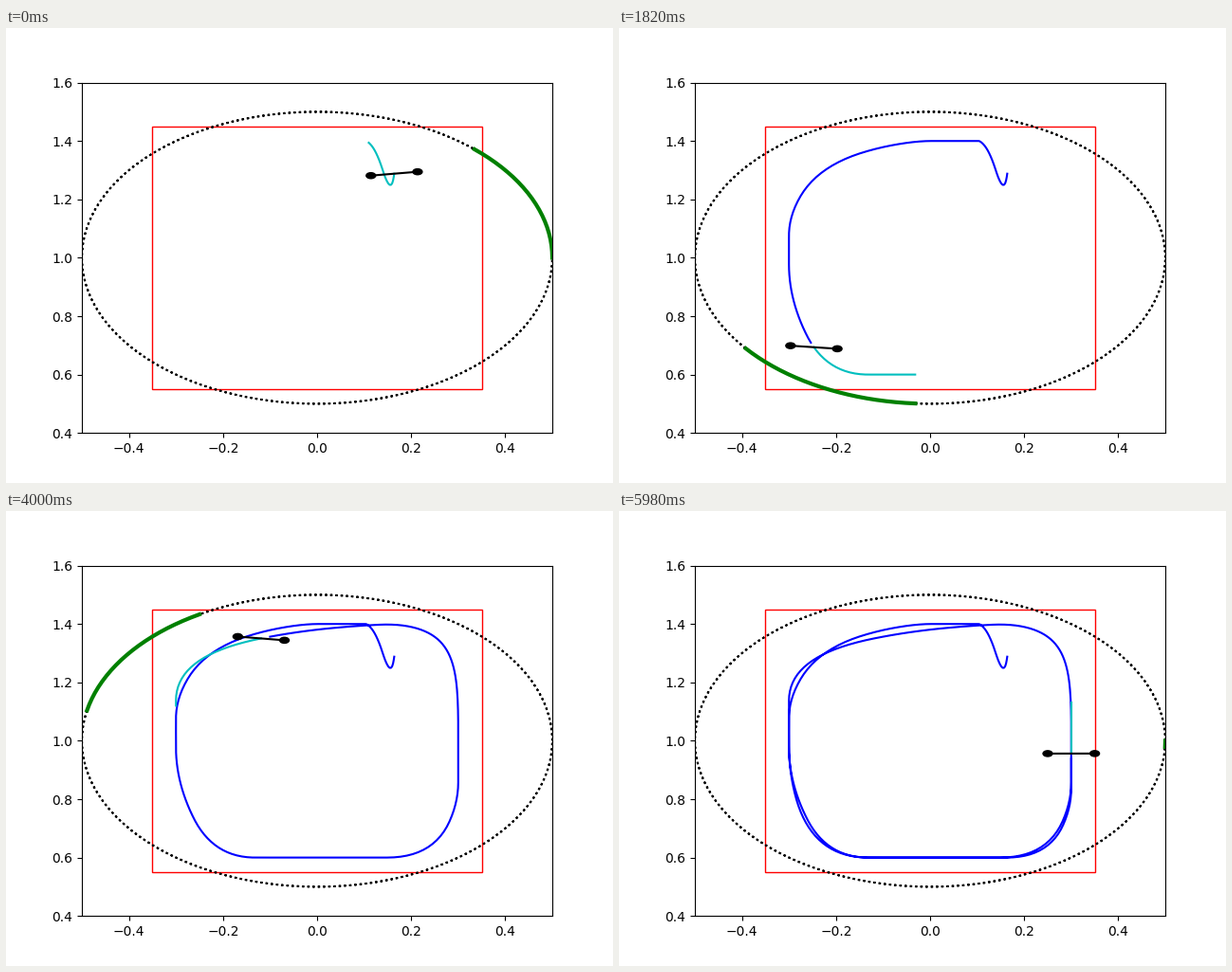
These frames come from a looping animation (640x480 px, 6 s). A matplotlib script:

```python
import numpy as np
import matplotlib.pyplot as plt
from matplotlib.animation import FuncAnimation
from matplotlib.patches import Circle, Rectangle

STEPS = 300       # two laps of the ellipse
HORIZON = 20      # look-ahead steps
ARM = 0.05
G = 9.81
DT = 0.02


def glide(t, dist, start, end, rise, fall, power=1):
    """Travel dist: speed rises as a power, stays level, falls linearly."""
    span = end - start
    u = np.clip(t - start, 0, span)
    ramp = rise * (np.minimum(u, rise) / rise) ** (power + 1) / (power + 1)
    level = np.maximum(u - rise, 0)
    brake = np.maximum(u - span + fall, 0) ** 2 / (2 * fall)
    total = span - rise * power / (power + 1) - fall / 2
    return dist * (ramp + level - brake) / total


# Each axis glides from wall to wall of the flight box
t = np.arange(STEPS + HORIZON)
px = (0.164
      + glide(t, -.064, 0, 27, 6, 8)
      + glide(t, -.4, 25, 69.5, 22, 19)
      + glide(t, .6, 75, 142, 42, 23)
      + glide(t, -.6, 150, 219, 42, 19, 2)
      + glide(t, .6, 227, 292, 33, 24))
py = (1.288
      + glide(t, -.045, 0, 7, 2, 4)
      + glide(t, .157, 4, 23, 6, 12)
      + glide(t, -.8, 41, 103.5, 21, 15)
      + glide(t, .8, 122, 186, 13, 31)
      + glide(t, -.8, 180, 253, 48, 18.8, 1.5)
      + glide(t, .53, 272, 319, 13, 20))

# The body leans into its sideways acceleration
kernel = np.exp(-0.5 * (np.arange(-9, 10) / 3) ** 2)
accel = np.pad(np.diff(px, 2), 10, mode="edge") / DT ** 2
accel = np.convolve(accel, kernel / kernel.sum(), mode="valid")
tilt = -np.arctan(accel / G)

theta = np.linspace(0, 4 * np.pi, STEPS + 1)
ref_x, ref_y = 0.5 * np.cos(theta), 1 + 0.5 * np.sin(theta)

fig, ax = plt.subplots(figsize=(6.4, 4.8), dpi=100)
ax.set_xlim(-0.5, 0.5)
ax.set_ylim(0.4, 1.6)
ax.add_patch(Rectangle((-.35, .55), .7, .9, fill=False, ec="red", lw=1))
ax.plot(ref_x, ref_y, "k:", lw=1.5)
trail, = ax.plot([], [], "b", lw=1.5)
plan, = ax.plot([], [], "c", lw=1.5)
goal, = ax.plot([], [], "g", lw=3)
body, = ax.plot([], [], "k", lw=1.5, zorder=3)
rotors = [ax.add_patch(Circle((0, 1), .01, color="k", zorder=3))
          for _ in range(2)]


def update(k):
    ahead = slice(k, k + HORIZON + 1)
    trail.set_data(px[:k], py[:k])
    plan.set_data(px[ahead], py[ahead])
    goal.set_data(ref_x[ahead], ref_y[ahead])
    dx, dy = ARM * np.cos(tilt[k]), ARM * np.sin(tilt[k])
    ends = [(px[k] - dx, py[k] - dy), (px[k] + dx, py[k] + dy)]
    body.set_data(*zip(*ends))
    for rotor, end in zip(rotors, ends):
        rotor.center = end
    return trail, plan, goal, body, *rotors


anim = FuncAnimation(fig, update, frames=STEPS, interval=20, repeat=True,
                     repeat_delay=0, init_func=lambda: update(0))
plt.show()
```
